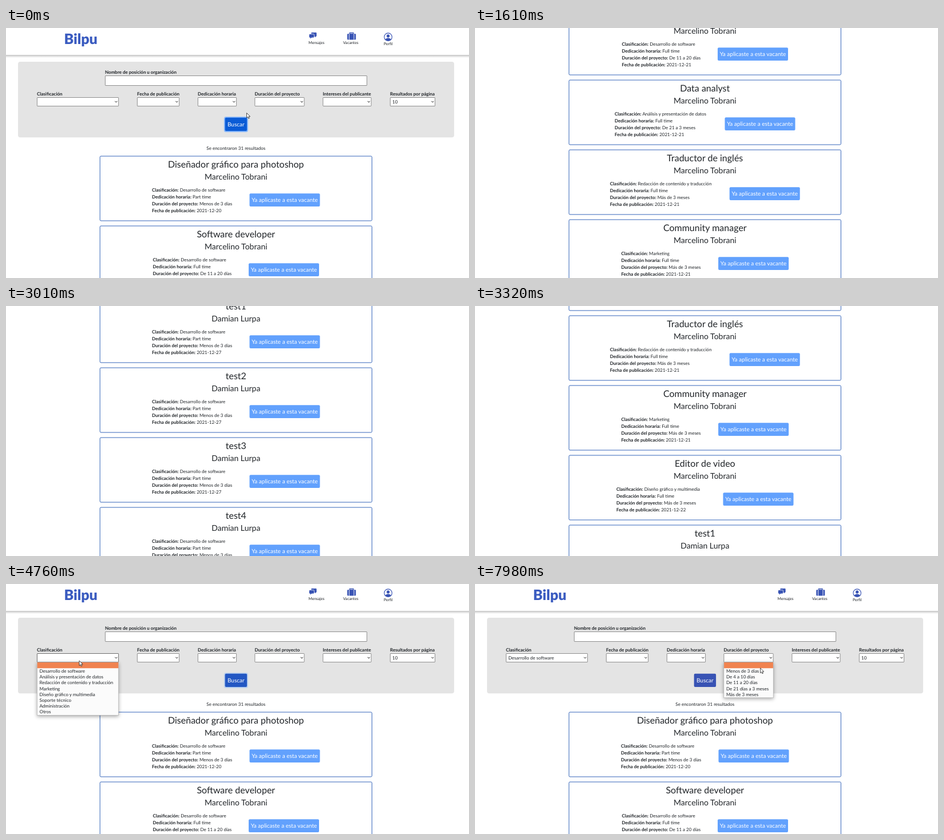
These frames come from a looping animation (809 px wide and 437 px high, 8000 ms). An HTML page:

```html
<!DOCTYPE html>
<html lang="es">
<head>
<meta charset="utf-8">
<title>Vacantes</title>
<style>
  html, body { margin: 0; height: 100%; overflow: hidden; background: #fff; }
  svg { display: block; width: 100vw; height: 100vh; }
  text { font-family: Lato, sans-serif; fill: #212529; text-rendering: geometricPrecision; }
  .bold { font-weight: 700; }
  .mid { text-anchor: middle; }
  .white { fill: #fff; }
  .popup { filter: drop-shadow(0 2px 3px rgba(0, 0, 0, .35)); }
</style>
</head>
<body>
<svg id="stage" viewBox="0 0 809 437"></svg>
<script>
const DURATION = 8000;
const INDIGO = '#3853b4';
const CENTER = 401.8;

const text = (x, y, content, size = 8, cls = '') =>
  `<text x="${x}" y="${y}" font-size="${size}" class="${cls}">${content}</text>`;
const rect = (x, y, w, h, fill, extra = '') =>
  `<rect x="${x}" y="${y}" width="${w}" height="${h}" fill="${fill}" ${extra}/>`;

// ---- header ----
const header = `
  ${rect(0, 47, 809, 5, 'url(#shade)')}
  ${rect(0, 0, 809, 47, '#fff')}
  <text x="101.5" y="28" font-size="25" font-weight="900" style="fill:#3a5bc0">Bilpu</text>
  <g fill="${INDIGO}" stroke="#fff" stroke-width=".7">
    <path d="M534.5 7.5H541.5Q543 7.5 543 9V13.5Q543 15 541.5 15V17L539 15H534.5Q533 15 533 13.5V9Q533 7.5 534.5 7.5Z"/>
    <path d="M531 10.5H537Q538.5 10.5 538.5 12V15.5Q538.5 17 537 17H534L531.5 19.5V17H531Q529.5 17 529.5 15.5V12Q529.5 10.5 531 10.5Z"/>
  </g>
  <path d="M600.5 10.5V8.5H607V10.5" fill="none" stroke="${INDIGO}" stroke-width="1.3"/>
  ${rect(596.3, 10, 15, 10.6, INDIGO, 'rx="1.5"')}
  <path d="M599.6 10V21M608 10V21" stroke="#fff" stroke-width=".9"/>
  <g fill="${INDIGO}">
    <circle cx="667.7" cy="15.7" r="6.8" fill="none" stroke="${INDIGO}" stroke-width="1.1"/>
    <circle cx="667.7" cy="13.9" r="2.6"/>
    <path d="M662.8 20Q664 17.4 667.7 17.4T672.6 20Q670.5 22.3 667.7 22.3T662.8 20Z"/>
  </g>
  ${text(542.5, 28.3, 'Mensajes', 6.8, 'mid')}
  ${text(602.4, 28.3, 'Vacantes', 6.8, 'mid')}
  ${text(667.8, 30.3, 'Perfil', 6.8, 'mid')}`;

// ---- search form ----
const fields = [
  ['clasificacion', 'Clasificación', 54, 143],
  ['fecha', 'Fecha de publicación', 229, 74],
  ['dedicacion', 'Dedicación horaria', 335, 68],
  ['duracion', 'Duración del proyecto', 434.5, 87],
  ['intereses', 'Intereses del publicante', 553.5, 85],
  ['cantidad', 'Resultados por página', 671, 79],
];

const select = ([id, label, x, w]) => `
  ${text(x, 118, label, 8, 'bold')}
  ${rect(x + .4, 121.5, w - .8, 15, '#fff', `id="${id}" stroke="#767676" stroke-width=".8" rx=".6"`)}
  <path d="M${x + w - 6.6} 127.8l2 2.2 2-2.2" fill="none" stroke="#222" stroke-width="1"/>`;

const form = `
  ${rect(21, 59, 762, 132.3, '#e4e4e4', 'rx="4"')}
  ${text(173, 79.8, 'Nombre de posición u organización', 8, 'bold')}
  ${rect(173.4, 83.5, 457.2, 17, '#fff', 'stroke="#767676" stroke-width=".8" rx=".6"')}
  ${fields.map(select).join('')}
  ${text(675, 131.8, '10')}
  <g id="chosen">${text(58.3, 131.8, 'Desarrollo de software')}</g>
  ${rect(382.7, 156.7, 38.4, 23.3, INDIGO, 'rx="2"')}
  <g id="focus">
    ${rect(380.9, 154.9, 42, 27, '#8bb9fa', 'rx="3.5"')}
    ${rect(382.7, 156.7, 38.4, 23.3, '#0b5cd6', 'rx="2"')}
  </g>
  ${text(CENTER, 172, 'Buscar', 10, 'mid white')}
  ${text(CENTER, 212.6, 'Se encontraron 31 resultados', 8, 'mid')}`;

// ---- result cards ----
const OWNER = 'Marcelino Tobrani';
const SOFTWARE = 'Desarrollo de software';
const LONG = 'Más de 3 meses';
const jobs = [
  ['Diseñador gráfico para photoshop', OWNER, SOFTWARE, 'Part time', 'Menos de 3 días', 20, 255],
  ['Software developer', OWNER, SOFTWARE, 'Full time', 'De 11 a 20 días', 21, 256.5],
  ['Data analyst', OWNER, 'Análisis y presentación de datos', 'Full time', 'De 21 a 3 meses', 21, 244],
  ['Traductor de inglés', OWNER, 'Redacción de contenido y traducción', 'Full time', LONG, 21, 235.8],
  ['Community manager', OWNER, 'Marketing', 'Full time', LONG, 21, 255.4],
  ['Editor de video', OWNER, 'Diseño gráfico y multimedia', 'Full time', LONG, 22, 247],
  ...[1, 2, 3, 4].map(n =>
    ['test' + n, 'Damian Lurpa', SOFTWARE, 'Part time', 'Menos de 3 días', 27, 255]),
];

const card = ([title, owner, area, hours, length, day, x], i) => {
  const lines = [['Clasificación', area], ['Dedicación horaria', hours],
    ['Duración del proyecto', length], ['Fecha de publicación', '2021-12-' + day]];
  const buttonX = 680.5 - x;
  return `<g transform="translate(0 ${224 + 122 * i})">
    ${rect(164.2, 0, 475.2, 113, '#fff', 'rx="1.8" stroke="#3464b9"')}
    ${text(CENTER, 20, title, 16, 'mid')}
    ${text(CENTER, 40.8, owner, 14, 'mid')}
    ${lines.map(([key, value], n) =>
      text(x, 61.7 + 12 * n, `<tspan class="bold">${key}:</tspan> ${value}`)).join('')}
    ${rect(buttonX, 65.2, 123, 22.8, '#62a1fd', 'rx="2"')}
    ${text(buttonX + 61.5, 80.4, 'Ya aplicaste a esta vacante', 10, 'mid white')}
  </g>`;
};

// ---- drop-down lists ----
const ROW = 10.2;
const popup = (id, x, w, options) => `
  <g id="${id}" class="popup">
    ${rect(x + .3, 136.8, w - .6, ROW * (options.length + 1) + .8, '#fbfbfb', 'stroke="#aaa" stroke-width=".6"')}
    ${rect(x + .6, 137, w - 1.2, ROW, '#f08350', 'class="mark"')}
    ${options.map((o, i) => text(x + 4.5, 155 + ROW * i, o)).join('')}
  </g>`;

const popups =
  popup('areas', 54, 143, [SOFTWARE, 'Análisis y presentación de datos',
    'Redacción de contenido y traducción', 'Marketing', 'Diseño gráfico y multimedia',
    'Soporte técnico', 'Administración', 'Otros']) +
  popup('lengths', 434.5, 87, ['Menos de 3 días', 'De 4 a 10 días', 'De 11 a 20 días',
    'De 21 días a 3 meses', LONG]);

document.getElementById('stage').innerHTML = `
  <defs><linearGradient id="shade" x2="0" y2="1">
    <stop stop-color="#c2c2c2"/><stop offset="1" stop-color="#fff"/>
  </linearGradient></defs>
  <g id="page">${header}${form}${jobs.map(card).join('')}${popups}</g>
  <path id="cursor" d="M0 0V8.6L2 6.8 3.3 9.7 4.8 9.1 3.5 6.2H6.2Z" fill="#fff"
    stroke="#222" stroke-width=".8" stroke-linejoin="round"/>`;

// ---- motion: [time, values...] ----
const scrollPath = [[1160, 0], [1610, 377], [1680, 377], [1980, 800], [2060, 800], [2160, 920],
  [2230, 920], [2780, 1030], [3009, 1030], [3010, 970], [3100, 970], [3640, 0]];
const cursorPath = [[310, 420.5, 148.5], [400, 418, 149.5], [700, 418, 149.5], [880, 606, 150],
  [4130, 586, 108], [4300, 400, 150], [4540, 128, 134], [5020, 128, 134], [5320, 125.3, 150],
  [5980, 125.3, 150], [6200, 240, 152], [6550, 570, 155], [6680, 549, 154], [6740, 540, 150],
  [6910, 499, 125], [7830, 499, 125], [7980, 498.6, 147]];

function sample(path, t) {
  const next = path.findIndex(p => p[0] > t);
  if (next < 0) return path[path.length - 1].slice(1);
  if (next === 0) return path[0].slice(1);
  const a = path[next - 1], b = path[next];
  const k = (t - a[0]) / (b[0] - a[0]);
  return a.slice(1).map((v, i) => v + (b[i + 1] - v) * k);
}

const $ = id => document.getElementById(id);
const show = (id, visible) => $(id).setAttribute('visibility', visible ? 'visible' : 'hidden');
const within = (t, from, to) => t >= from && t < to;

function draw(t) {
  const [scroll] = sample(scrollPath, t);
  const [x, y] = sample(cursorPath, t);
  const cursorVisible = !within(t, 880, 4130);
  $('page').setAttribute('transform', `translate(0 ${-scroll})`);
  $('cursor').setAttribute('transform', `translate(${x} ${y})`);
  show('cursor', cursorVisible);

  $('focus').setAttribute('opacity', 1 - Math.min(1, Math.max(0, (t - 4680) / 150)));
  show('chosen', t >= 5880);
  show('areas', within(t, 4760, 5880));
  show('lengths', t >= 7050);
  document.querySelector('#areas .mark').setAttribute('y', t < 5200 ? 137 : 137 + ROW);

  for (const [id, , left, width] of fields) {
    const hovered = cursorVisible && within(x, left, left + width) && within(y, 121, 137);
    const focused = id === 'clasificacion' && within(t, 5880, 7050);
    $(id).setAttribute('stroke', focused ? '#111' : hovered ? '#4f4f4f' : '#767676');
    $(id).setAttribute('stroke-width', focused ? 1.3 : .8);
  }
}

function frame() {
  draw(performance.now() % DURATION);
  requestAnimationFrame(frame);
}
frame();
</script>
</body>
</html>
```
